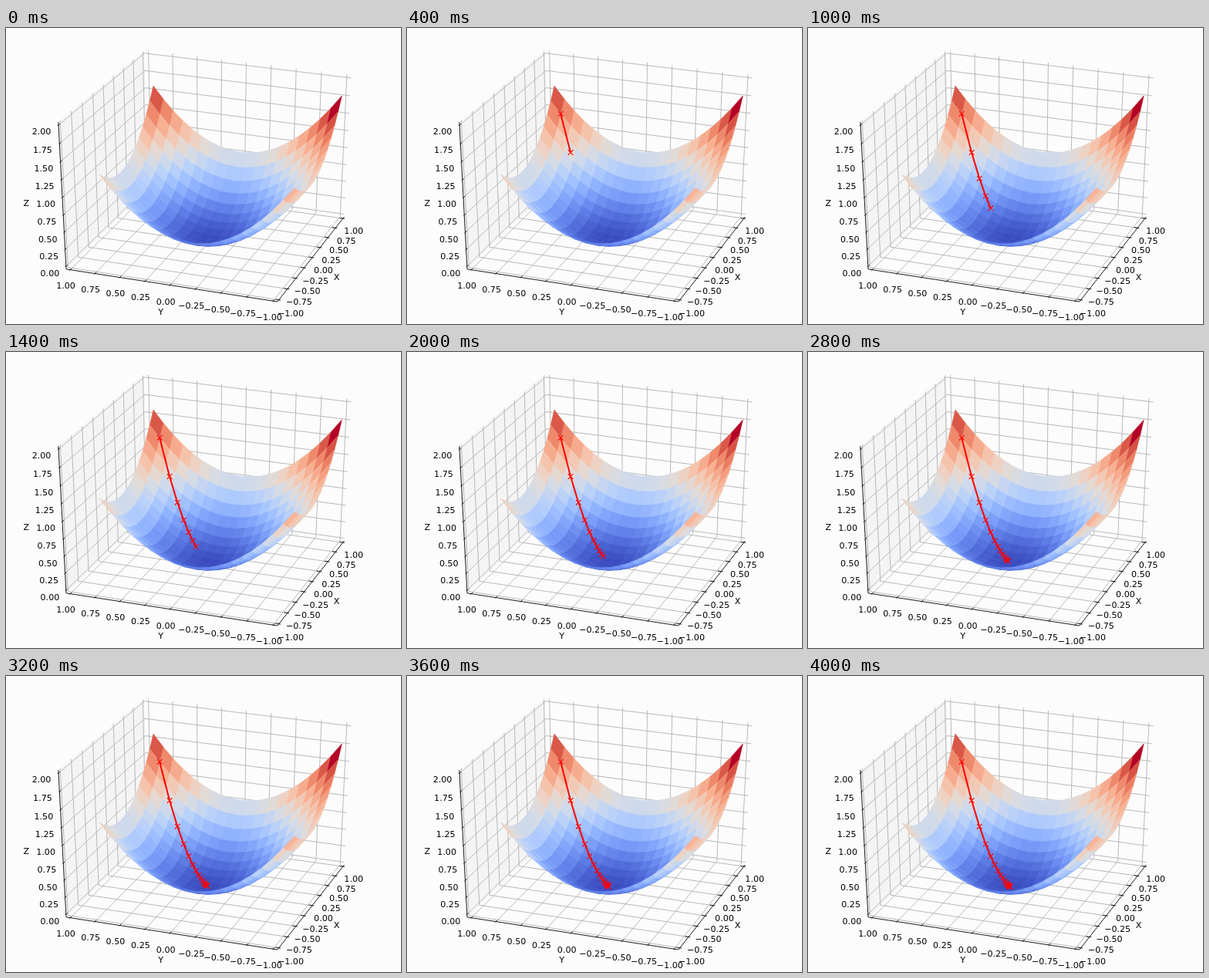
An HTML page with a canvas that plays this animation: 512 by 384 pixels, repeating every 4.2 s.

```html
<!DOCTYPE html>
<html lang="en">
<head>
<meta charset="utf-8">
<title>Gradient descent on a paraboloid</title>
<style>
html, body { margin: 0; width: 100%; height: 100%; overflow: hidden; background: #fcfcfc; }
canvas { display: block; width: 512px; height: 384px; }
</style>
</head>
<body>
<canvas id="stage" width="512" height="384"></canvas>
<script>
const ctx = document.getElementById('stage').getContext('2d');
const STEP = 200, STEPS = 21;
const EDGE = 25 / 24;          // panes lie slightly outside the data range
const LOW = 1 - EDGE, HIGH = 1 + EDGE;
const TICK_PAD = 0.1141, LABEL_PAD = 0.248;

// Cool-to-warm colour stops
const RAMP = [
  [59, 76, 192], [77, 104, 215], [98, 130, 234], [119, 154, 247], [141, 176, 254],
  [163, 194, 255], [184, 208, 249], [204, 217, 238], [221, 221, 221], [236, 211, 197],
  [245, 196, 173], [247, 177, 148], [244, 154, 123], [236, 127, 99], [222, 96, 77],
  [203, 62, 56], [180, 4, 38]
];

function ramp(v) {
  const p = v * (RAMP.length - 1);
  const i = Math.min(Math.floor(p), RAMP.length - 2);
  const mix = RAMP[i].map((c, k) => Math.round(c + (RAMP[i + 1][k] - c) * (p - i)));
  return `rgb(${mix})`;
}

// Perspective camera: elevation 30 degrees, azimuth 200 degrees, distance 10
const rad = Math.PI / 180;
const sinE = Math.sin(30 * rad), cosE = Math.cos(30 * rad);
const sinA = Math.sin(200 * rad), cosA = Math.cos(200 * rad);

function project([x, y, z]) {
  const a = x / 2, b = y / 2, c = (z - 1) / 2;
  const right = -sinA * a + cosA * b;
  const out = cosA * a + sinA * b;
  const up = cosE * c - sinE * out;
  const depth = 10 - cosE * out - sinE * c;
  return [
    (right / depth + 0.095) * 512 / 0.185,
    384 - (up / depth + 0.095) * 384 / 0.185,
    depth
  ];
}

function trace(points) {
  ctx.beginPath();
  for (const p of points) {
    const [x, y] = project(p);
    ctx.lineTo(x, y);
  }
}

function line(color, width, ...points) {
  trace(points);
  ctx.strokeStyle = color;
  ctx.lineWidth = width;
  ctx.stroke();
}

function text(str, point, drop) {
  const [x, y] = project(point);
  ctx.fillText(str, x, y + drop);
}

const label = v => v.toFixed(2).replace('-', '\u2212');
const grid = (...points) => line('#b0b0b0', 0.89, ...points);
const axis = (...points) => line('#000', 0.89, ...points);

function drawAxes() {
  const E = EDGE, inner = E - 1 / 30, outer = E + 1 / 60;
  const far = E + TICK_PAD, below = LOW - TICK_PAD;

  trace([[-E, E, LOW], [E, E, LOW], [E, E, HIGH], [-E, E, HIGH]]);
  ctx.fillStyle = '#f4f4f4';
  ctx.fill();

  for (let i = 0; i <= 8; i++) {
    const v = i / 4 - 1, z = i / 4;
    grid([v, -E, LOW], [v, E, LOW], [v, E, HIGH]);
    grid([-E, v, LOW], [E, v, LOW], [E, v, HIGH]);
    grid([-E, E, z], [E, E, z], [E, -E, z]);
  }

  axis([-E, -E, LOW], [E, -E, LOW]);
  axis([-E, -E, LOW], [-E, E, LOW]);
  axis([-E, E, LOW], [-E, E, HIGH]);

  ctx.fillStyle = '#000';
  ctx.font = '11.11px "DejaVu Sans", sans-serif';
  ctx.textAlign = 'center';
  for (let i = 0; i <= 8; i++) {
    const v = i / 4 - 1, z = i / 4;
    axis([v, -outer, LOW], [v, -inner, LOW]);
    axis([-outer, v, LOW], [-inner, v, LOW]);
    axis([-outer, E, z], [-inner, E, z]);
    text(label(v), [v, -far, below], 8.5);
    text(label(v), [-far, v, below], 8.5);
    text(label(z), [-far, far, z], 8.5);
  }
  const away = E + LABEL_PAD, under = LOW - LABEL_PAD;
  text('X', [0, -away, under], 3);
  text('Y', [-away, 0, under], 3);
  text('Z', [-away, away, 1], 3);
}

const bowl = (x, y) => [x, y, x * x + y * y];

// Facets of the surface, farthest first
function buildFacets() {
  const facets = [];
  for (let i = -5; i < 9; i++) {
    for (let j = -10; j < 9; j++) {
      const quad = [[i, j], [i + 1, j], [i + 1, j + 1], [i, j + 1]]
        .map(([x, y]) => bowl(x / 10, y / 10));
      const mean = f => quad.reduce((sum, p) => sum + f(p), 0) / 4;
      facets.push({ quad, height: mean(p => p[2]), depth: mean(p => project(p)[2]) });
    }
  }
  const heights = facets.map(f => f.height);
  const min = Math.min(...heights), max = Math.max(...heights);
  for (const f of facets) f.color = ramp((f.height - min) / (max - min));
  return facets.sort((a, b) => b.depth - a.depth);
}

const facets = buildFacets();

function drawSurface() {
  for (const { quad, color } of facets) {
    trace(quad);
    ctx.closePath();
    ctx.fillStyle = ctx.strokeStyle = color;
    ctx.lineWidth = 0.6;
    ctx.fill();
    ctx.stroke();
  }
}

// Each descent step shrinks both coordinates by a fifth
function drawDescent(count) {
  const path = Array.from({ length: count }, (_, k) => {
    const c = 0.8 ** (k + 1);
    return bowl(c, c);
  });
  if (count > 1) line('#f00', 2, ...path);
  ctx.strokeStyle = '#f00';
  ctx.lineWidth = 1.11;
  const r = 3.33;
  for (const p of path) {
    const [x, y] = project(p);
    ctx.beginPath();
    ctx.moveTo(x - r, y - r);
    ctx.lineTo(x + r, y + r);
    ctx.moveTo(x - r, y + r);
    ctx.lineTo(x + r, y - r);
    ctx.stroke();
  }
}

ctx.lineJoin = 'round';
const start = performance.now();
let shown = -1;

function frame() {
  const count = Math.floor((performance.now() - start) / STEP) % STEPS;
  if (count !== shown) {
    shown = count;
    ctx.fillStyle = '#fcfcfc';
    ctx.fillRect(0, 0, 512, 384);
    drawAxes();
    drawSurface();
    drawDescent(count);
  }
  requestAnimationFrame(frame);
}
frame();
</script>
</body>
</html>
```
